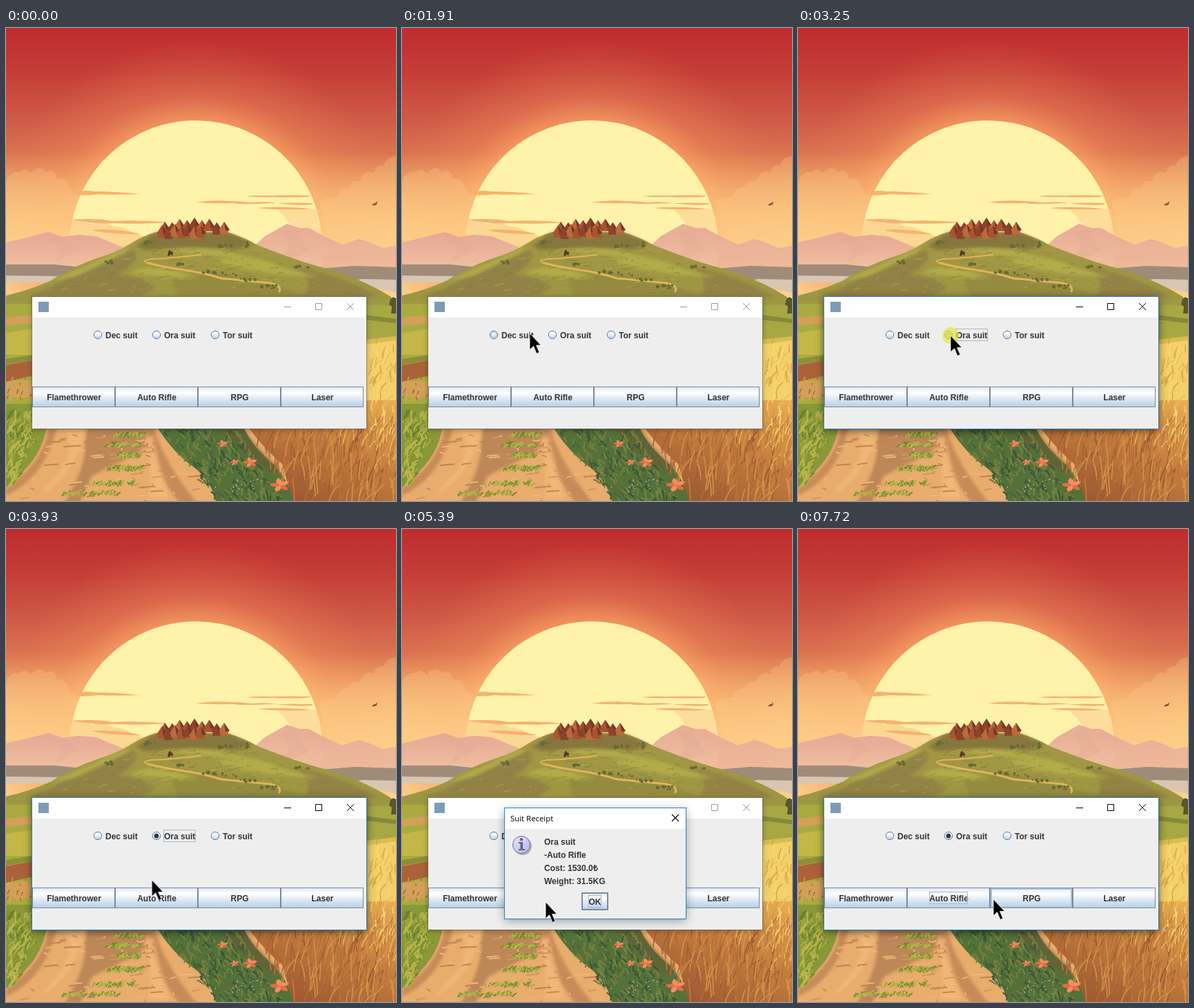
These frames come from a looping animation (565x686 px, 8 s). An HTML page:

```html
<!DOCTYPE html>
<html lang="en">
<head>
<meta charset="utf-8">
<title>Suit Receipt</title>
<style>
html,body{margin:0;width:100%;height:100%;overflow:hidden}
svg{display:block}
text{font:bold 12px "Liberation Sans",Arial,sans-serif;fill:#333}
.mid{text-anchor:middle}
.title{font:11.4px "Open Sans","Noto Sans",sans-serif;fill:#000}
.line{fill:none;stroke-width:1}
.focus{fill:none;stroke:#a3b8cc}

/* Switched parts: hidden unless their keyframes show them */
.sw{opacity:0;animation:8s step-end infinite}
.dec{animation-name:dec}
.ora{animation-name:ora}
.tor{animation-name:tor}
.radioDown{animation-name:radioDown}
.picked{animation-name:picked}
.oraFocus{animation-name:oraFocus}
.active{animation-name:active}
.rifleOver{animation-name:rifleOver}
.rifleDown{animation-name:rifleDown}
.rifleFocus{animation-name:rifleFocus}
.rpgOver{animation-name:rpgOver}
.okDown{animation-name:okDown}
.glow{animation-name:glow}
@keyframes dec{17.04%{opacity:1}24.8%{opacity:0}}
@keyframes ora{7.25%,24.8%,35.69%{opacity:1}16.09%,29.75%,44.46%{opacity:0}}
@keyframes tor{30.75%{opacity:1}35.69%{opacity:0}}
@keyframes radioDown{40.625%{opacity:1}41.625%{opacity:0}}
@keyframes picked{41.625%{opacity:1}}
@keyframes oraFocus{40.625%{opacity:1}62.75%{opacity:0}}
@keyframes active{40.625%,94.66%{opacity:1}64.625%{opacity:0}}
@keyframes rifleOver{50.25%{opacity:1}62.75%{opacity:0}}
@keyframes rifleDown{62.75%{opacity:1}64.625%{opacity:0}}
@keyframes rifleFocus{62.75%{opacity:1}}
@keyframes rpgOver{96.5%{opacity:1}}
@keyframes okDown{93.75%{opacity:1}94.66%{opacity:0}}
@keyframes glow{40.625%,62.75%,93.75%{opacity:.68}41.625%,64.625%,94.66%{opacity:0}}

.dialog{transform-origin:280px 485px;animation:dialog 8s linear infinite}
@keyframes dialog{
  0%{opacity:0;transform:scale(.92)}
  64.625%{opacity:0;transform:scale(.92);animation-timing-function:steps(4,start)}
  68.29%{opacity:1;transform:scale(1)}
  94.66%{opacity:1;transform:scale(1);animation-timing-function:steps(3,start)}
  97.42%,100%{opacity:0;transform:scale(.92)}
}

/* The pointer was sampled, so each move is a run of equal jumps */
.cursor{animation:move 8s linear infinite}
@keyframes move{
  0%{transform:translate(492px,705px)}
  1.5%{transform:translate(492px,705px);animation-timing-function:steps(7,start)}
  8.21%{transform:translate(267px,443px)}
  15.125%{transform:translate(267px,443px);animation-timing-function:steps(4,start)}
  18.96%{transform:translate(153px,442px)}
  23.875%{transform:translate(153px,442px);animation-timing-function:steps(3,start)}
  26.69%{transform:translate(249px,444px)}
  29.75%{transform:translate(249px,444px);animation-timing-function:steps(2,start)}
  31.75%{transform:translate(321px,444px)}
  34.75%{transform:translate(321px,444px);animation-timing-function:steps(2,start)}
  36.625%{transform:translate(276px,455px);animation-timing-function:steps(3,start)}
  39.44%{transform:translate(221px,446px)}
  43.5%{transform:translate(221px,446px);animation-timing-function:steps(8,start)}
  51.21%{transform:translate(208px,530px)}
  57.875%{transform:translate(208px,530px);animation-timing-function:steps(2,start)}
  59.875%{transform:translate(208px,541px)}
  81.875%{transform:translate(208px,541px);animation-timing-function:steps(7,start)}
  88.73%,100%{transform:translate(283px,537px)}
}
</style>
</head>
<body>
<svg width="565" height="686" viewBox="0 0 565 686">
<defs>
  <linearGradient id="sky" x2="0" y2="1">
    <stop stop-color="#bf2c2f"/><stop offset=".17" stop-color="#c53e38"/>
    <stop offset=".35" stop-color="#d05c48"/><stop offset=".52" stop-color="#df7f54"/>
    <stop offset=".66" stop-color="#f0a362"/><stop offset=".78" stop-color="#fac27a"/>
    <stop offset="1" stop-color="#fdd590"/>
  </linearGradient>
  <radialGradient id="halo" gradientUnits="userSpaceOnUse" cx="275" cy="317" r="300">
    <stop offset=".6" stop-color="#f9a063" stop-opacity=".85"/>
    <stop offset=".73" stop-color="#f08a58" stop-opacity=".42"/>
    <stop offset="1" stop-color="#e87850" stop-opacity="0"/>
  </radialGradient>
  <linearGradient id="dusk" x2="0" y2="1">
    <stop stop-color="#fdc981" stop-opacity="0"/><stop offset=".65" stop-color="#fdc981" stop-opacity=".8"/>
    <stop offset="1" stop-color="#fdd08a"/>
  </linearGradient>
  <linearGradient id="peak" x2="0" y2="1">
    <stop stop-color="#e6a795"/><stop offset="1" stop-color="#f0bf9f"/>
  </linearGradient>
  <linearGradient id="hill" x2="0" y2="1">
    <stop stop-color="#a49745"/><stop offset=".6" stop-color="#9d9642"/><stop offset="1" stop-color="#b0a843"/>
  </linearGradient>
  <linearGradient id="wheat" x1="1" x2=".2" y2="1">
    <stop stop-color="#eab052"/><stop offset=".4" stop-color="#c98240"/><stop offset="1" stop-color="#96522f"/>
  </linearGradient>
  <linearGradient id="steel" x2="0" y2="1">
    <stop stop-color="#dde8f3"/><stop offset=".3" stop-color="#fff"/>
    <stop offset=".6" stop-color="#dde8f3"/><stop offset="1" stop-color="#b8cfe5"/>
  </linearGradient>
  <linearGradient id="lilac" x2="1" y2="1">
    <stop stop-color="#e6e6ff"/><stop offset="1" stop-color="#b4b4f0"/>
  </linearGradient>
  <filter id="soft" x="-20%" y="-30%" width="140%" height="160%">
    <feDropShadow dx="0" dy="2" stdDeviation="4" flood-opacity=".32"/>
  </filter>
  <filter id="deep" x="-20%" y="-30%" width="140%" height="160%">
    <feDropShadow dx="0" dy="3" stdDeviation="7" flood-opacity=".38"/>
  </filter>
  <filter id="blur"><feGaussianBlur stdDeviation="2"/></filter>
  <clipPath id="disc"><circle cx="275" cy="317" r="183"/></clipPath>
</defs>

<!-- Sky -->
<rect width="565" height="390" fill="url(#sky)"/>
<rect width="565" height="390" fill="url(#halo)"/>
<rect y="180" width="565" height="150" fill="url(#dusk)"/>
<g fill="#fbcb8c" opacity=".28">
  <path d="M0 222q8-16 20-13 8-8 16 2 12-14 22-2 12-8 16 10 14-4 18 16l20 12-12 33 30 12 40 10v30H0z"/>
  <path d="M565 186q-14 0-18 14-10-4-14 10-14-6-20 12-12-4-18 10-10-4-16 12l-26 6 8 35 10 30h94z"/>
</g>
<circle cx="275" cy="317" r="183" fill="#fff2ab"/>
<g clip-path="url(#disc)">
  <path d="M84 278q28 2 42 6 18-4 30 4 16 0 24 8l20 6-30 18H80z" fill="#fbd793"/>
  <path d="M392 262h72v60h-44q0-36-28-60z" fill="#fcd596" opacity=".7"/>
</g>
<g fill="#f6b26f">
  <path d="M100 239q14-5 28-2 32 0 66 4-44 1-60 0-24 3-40 0z"/>
  <path d="M274 253q26-4 48-2 18 0 34 2 22-2 36 1l-30 1q-20 1-34-1-26 1-54-1zm74-9q18-2 34-1 30-1 60 0l-5 2q-30 1-50 0-22 1-39-1zm44 10q26-1 52 0v2q-24 2-52-2zm-28 7q34-3 78 1l-10 1q-44 1-68-2z"/>
  <path d="M92 278q40-3 62 2 42-2 82 2-48 3-80 1-24 2-64-5zm32 15q20-2 54 2l18 4q-52 0-72-6z"/>
</g>
<path d="M530 257q2-3 5-3l3-3-1 5q-3 2-7 1z" fill="#8a513c"/>

<!-- Mountains and water -->
<path d="M0 311l30-7 32-8 20 7 22-3 26 2 37 15 60 30H0z" fill="url(#peak)"/>
<path d="M355 320l20-18 14-8 18-10 18 6 14 0 22 12 26 12 24-8 16 5 18 8 20-3v50H350z" fill="url(#peak)" opacity=".92"/>
<path d="M60 306l20 12-8 22 36-20-24-16zm340-12l10 26-16 20 46-16-24-32z" fill="#dfa592" opacity=".3"/>
<path d="M0 343l70 0 40 4v14H0zm565 4l-60-2-50 4 40 16 70 6z" fill="#a08b79"/>
<path d="M0 359l85 1-25 9H0zm565 6-50-1-15 4 65 16z" fill="#d9c6b2"/>

<!-- Hill -->
<path d="M0 388q35-8 66-22 26-18 66-32 30-9 48-21 18-12 38-17h102q24 7 45 19 60 24 100 34 60 18 100 46v60H0z" fill="url(#hill)"/>
<g filter="url(#blur)">
  <path d="M62 378q46-30 124-56 10 16-24 36 34 2 54 18l-20 12H30z" fill="#8a7549" opacity=".6"/>
  <path d="M215 297h108l35 16-26 8-62-3-68 4-14-6z" fill="#7b6a3c" opacity=".7"/>
  <path d="M240 364q70-16 120 0t80 26H250z" fill="#8c803f" opacity=".5"/>
  <path d="M420 346q66 12 120 44H430q20-22-10-44z" fill="#8b7448" opacity=".55"/>
  <path d="M64 368q62-28 116-52l-8 10-70 34zM300 338q50-12 84 2 30 14 70 20-70 2-154-22zM180 356q22-14 60-6l40 14q-50-2-100-8zM230 322q40-6 90 2 20 6 40 10-60-2-130-12z" fill="#b6b04c" opacity=".85"/>
</g>
<g id="turf" fill="none" stroke-linecap="round" opacity=".55"></g>
<g fill="none" stroke="#e2b45c" stroke-linecap="round">
  <path d="M282 329q-46 5-72 6-18 3 0 7" stroke-width="2"/>
  <path d="M206 341q24 6 46 9 30 4 60 13l72 7q16 4 12 12" stroke-width="3"/>
</g>
<g id="town"></g>
<g id="bushes" fill="#666b35"></g>
<path d="M234 330l1-5 2-4 2 3 3 1-1 6-2-3-3 3z" fill="#573a2a"/>

<!-- Fields -->
<rect y="400" width="40" height="190" fill="#a9ab40"/>
<path d="M0 420l40-4v12l-40 4zm0 92h40v24H0z" fill="#d2a058"/>
<path d="M0 442l40-6v38H0z" fill="#c3b748"/>
<path d="M0 480l40-6v8l-40 6z" fill="#8b8f3a"/>
<path d="M0 489l40-7v22l-40 9z" fill="#ac6238"/>
<rect x="520" y="402" width="45" height="190" fill="#f3d068"/>
<path d="M520 402h45v50h-45z" fill="#a7a744"/>
<path d="M520 416l45 6v6l-45-5z" fill="#858a3a"/>
<path d="M520 452l45-5v6l-45 6z" fill="#d8bd50"/>
<path d="M558 414l1-10-4-3 2-8 4-3 4 2v22z" fill="#59572c"/>

<!-- Foreground -->
<rect y="545" width="200" height="141" fill="#8b9838"/>
<path d="M60 570H565v116H0v-20q16-6 26-24 30-30 34-72z" fill="#e8ac6c"/>
<g filter="url(#blur)">
  <path d="M118 572h84q6 20-8 44-40 18-70 34l-18 40H84q30-50 30-80z" fill="#ac7850" opacity=".7"/>
  <path d="M62 572q-2 42-38 76l-24 20v10q58-26 76-106zm150 0q14 56 66 118h-26q-42-54-50-118z" fill="#b87e50" opacity=".7"/>
  <path d="M84 584q18 20-2 54l-34 40q50-24 66-94zM212 590q12 50 24 92h-30q6-40-4-84z" fill="#f4bb7c" opacity=".7"/>
</g>
<path d="M338 560q28 44 62 72 10 30 12 54h153V540h-45v20z" fill="url(#wheat)"/>
<path d="M214 570q24 44 62 70 22 20 28 46h112q-8-36-34-58-30-26-42-58z" fill="#55713a"/>
<path d="M300 572h40q14 30 56 66l-12 8q-50-34-84-74z" fill="#6b5a35" opacity=".6" filter="url(#blur)"/>
<g id="grass" fill="none" stroke-linecap="round"></g>
<g id="flowers"></g>

<!-- Main window -->
<rect x="38" y="390" width="484" height="191" filter="url(#soft)"/>
<rect class="sw active" x="38" y="390" width="484" height="191" filter="url(#deep)"/>
<rect x="38" y="390" width="484" height="191" fill="#eee"/>
<rect x="38" y="390" width="484" height="30" fill="#fff"/>
<rect class="line" x="37.5" y="389.5" width="485" height="192" stroke="#666" stroke-opacity=".55"/>
<rect class="line sw active" x="37.5" y="389.5" width="485" height="192" stroke="#2b83bd"/>
<rect x="47" y="397" width="15" height="15" fill="#7d9bb5"/>
<path id="chrome" class="line" d="M403 404.5h10M448.5 399.5h9v9h-9zM494 399l10 10m0-10l-10 10" stroke="#999"/>
<use href="#chrome" class="sw active" style="filter:brightness(0)"/>
<g id="radios"></g>
<rect class="focus sw oraFocus" x="228.5" y="436.5" width="46" height="17"/>
<g id="buttons"></g>
<rect class="line sw rifleOver" x="160" y="522" width="116" height="26" stroke="#b8cfe5" style="stroke-width:2"/>
<rect class="line sw rpgOver" x="280" y="522" width="116" height="26" stroke="#a9c3dd" style="stroke-width:2"/>
<g class="sw rifleDown">
  <rect x="159" y="521" width="119" height="28" fill="#b8cfe5"/>
  <path class="line" d="M159.5 549v-27.5h118" stroke="#7a8a99"/>
  <text class="mid" x="218" y="540">Auto Rifle</text>
</g>
<rect class="focus sw rifleFocus" x="190.5" y="526.5" width="55" height="17"/>

<!-- Receipt -->
<g class="dialog">
  <rect x="149" y="405" width="262" height="160" filter="url(#deep)"/>
  <rect x="148.5" y="404.5" width="263" height="161" fill="#eee" stroke="#2286c6"/>
  <rect x="149" y="405" width="262" height="30" fill="#fff"/>
  <text class="title" x="157" y="424">Suit Receipt</text>
  <path class="line" d="M391 414l10 10m0-10l-10 10" stroke="#000" style="stroke-width:1.2"/>
  <circle cx="175" cy="460" r="13" fill="#999" opacity=".7"/>
  <circle cx="173" cy="458" r="12.5" fill="url(#lilac)" stroke="#666d99"/>
  <path d="M169 454h6v10h3v2h-9v-2h2.5v-8H169zM171 448.5h4v3.5h-4z" fill="#666"/>
  <text x="206" y="458">Ora suit</text>
  <text x="206" y="477">-Auto Rifle</text>
  <text x="206" y="496">Cost: 1530.0₺</text>
  <text x="206" y="515">Weight: 31.5KG</text>
  <rect x="261" y="528" width="37" height="24" fill="url(#steel)" stroke="#7a8a99" stroke-width="2"/>
  <rect class="sw okDown" x="262" y="529" width="35" height="22" fill="#b8cfe5"/>
  <rect class="focus" x="270.5" y="531.5" width="18" height="17"/>
  <text class="mid" x="279.5" y="545">OK</text>
</g>

<g class="cursor">
  <circle class="sw glow" r="12" fill="#e6e638"/>
  <path d="M0 0V24L5.5 18.8 10 29.5 14 27.8 9.5 17.5H16.5Z" stroke="#fff" stroke-width=".8"/>
</g>
</svg>

<script>
const $ = id => document.getElementById(id);
let seed = 11;
const rnd = () => (seed = seed * 16807 % 2147483647) / 2147483647;
const between = (a, b) => a + (b - a) * rnd();
const mix = (a, b, k) => a + (b - a) * k;

// Widgets
const radios = [['Dec suit', 133, 'dec'], ['Ora suit', 218, 'ora'], ['Tor suit', 303, 'tor']];
$('radios').innerHTML = radios.map(([label, x, over]) =>
  `<circle cx="${x}" cy="445" r="5.7" fill="url(#steel)" stroke="#5f7b9c"/>
   <circle class="line sw ${over}" cx="${x}" cy="445" r="4" stroke="#b8cfe5" style="stroke-width:2"/>
   <text x="${x + 11}" y="450">${label}</text>`).join('') +
  `<circle class="sw radioDown" cx="218" cy="445" r="5" fill="#b8c4ce"/>
   <circle class="sw picked" cx="218" cy="445" r="3.3" fill="#333"/>`;
$('buttons').innerHTML = ['Flamethrower', 'Auto Rifle', 'RPG', 'Laser'].map((label, i) =>
  `<rect x="${38.5 + i * 120}" y="520.5" width="119" height="29" fill="url(#steel)" stroke="#7a8a99"/>
   <text class="mid" x="${98.5 + i * 120}" y="540">${label}</text>`).join('');

// Two overlapping rows of roofs, highest in the middle of the hilltop
const roofs = ['#a9532f', '#8d432b', '#bd6a3a'];
const roofRow = (count, left, right, top, rise) => Array.from({length: count}, (_, i) => {
  const k = i / (count - 1), x = mix(left, right, k), y = top - rise * Math.sin(k * Math.PI) + i % 2 * 3;
  return `<path d="M${x - 8} ${y + 12}L${x} ${y}l8 12-2 1v5h-12v-5z" fill="${roofs[i % 3]}"/>
    <path d="M${x} ${y}l8 12-6 1z" fill="#74382a"/>`;
}).join('');
$('town').innerHTML = roofRow(9, 230, 316, 281, 6) + roofRow(7, 226, 282, 286, 2);

const clumps = [[210, 312, 9, 4], [318, 317, 9, 3], [344, 315, 7, 4], [318, 357, 18, 3], [292, 354, 9, 2],
  [352, 366, 12, 2], [252, 343, 7, 2], [428, 347, 12, 2], [148, 340, 8, 2], [382, 376, 14, 3]];
$('bushes').innerHTML = clumps.map(([x, y, w, h]) => Array.from({length: 7}, () =>
  `<circle cx="${between(x - w, x + w)}" cy="${between(y - h, y + h / 2)}" r="${between(1, 2.6)}"/>`).join('')).join('');

// Blades fill a band given by its top and bottom edges: [y, left, right]
function blades(layer, [y0, l0, r0], [y1, l1, r1], count, len, lean, width, colors) {
  const paths = colors.map(color => {
    let d = '';
    for (let i = 0; i < count; i++) {
      const k = rnd(), y = mix(y0, y1, k), x = between(mix(l0, l1, k), mix(r0, r1, k));
      const h = len * between(.5, 1.2), w = lean * between(-.4, 1.3);
      d += `M${x.toFixed(1)} ${y.toFixed(1)}q${(w * .2).toFixed(1)}-${(h * .6).toFixed(1)} ${w.toFixed(1)}-${h.toFixed(1)}`;
    }
    return `<path d="${d}" stroke="${color}" stroke-width="${width}"/>`;
  });
  $(layer).innerHTML += paths.join('');
}
const greens = ['#66802f', '#a5ab40', '#7f9336', '#b9b54a'];
blades('turf', [318, 205, 350], [386, 40, 500], 60, 1.5, 9, 1.3, ['#7f7a3a', '#b7ac4e', '#8a7846']);
blades('grass', [560, 0, 58], [664, 0, 10], 60, 9, 7, 2.2, greens);
blades('grass', [500, 0, 38], [545, 0, 38], 12, 5, 3, 1.5, ['#d9a558', '#a9683a']);
blades('grass', [590, 64, 225], [690, 10, 290], 24, 2, 18, 2, ['#efb577', '#d3955f', '#c08355']);
[[592, 176, 22], [607, 166, 28], [622, 178, 18], [641, 172, 30], [663, 156, 38], [677, 120, 46]].forEach(([y, x, w]) =>
  blades('grass', [y - 2, x - w * .7, x + w * .7], [y + 2, x - w, x + w], 13, 5, 6, 1.7, greens));
blades('grass', [585, 222, 335], [690, 306, 405], 65, 7, -6, 2.2, ['#446138', '#6d873f', '#3c5537', '#7c7c3e']);
blades('grass', [590, 352, 565], [695, 415, 565], 50, 34, 16, 1.5, ['#a05c35', '#c67f3d', '#b46c39', '#d3934a']);
blades('grass', [585, 480, 565], [640, 500, 565], 18, 30, 14, 1.5, ['#ebbb5c', '#c78342']);
blades('grass', [455, 522, 565], [590, 522, 565], 20, 14, 7, 1.4, ['#e5b955', '#f8da7a', '#d6a14a']);

const bloom = ([x, y, r]) => [0, 1, 2, 3, 4].map(i =>
  `<path d="M0 0q${r * .5}-${r * .55} ${r} 0-${r * .5} ${r * .55}-${r} 0" transform="translate(${x} ${y}) scale(1 .7) rotate(${i * 72 - 30})" fill="${i % 2 ? '#e86c40' : '#fa8a62'}"/>`).join('');
const specks = Array.from({length: 22}, () =>
  `<circle cx="${between(285, 375)}" cy="${between(640, 680)}" r="1" fill="#9cb0a8"/>`).join('');
$('flowers').innerHTML = specks + [[314, 603, 8], [354, 630, 11], [331, 630, 7], [397, 663, 15]].map(bloom).join('');
</script>
</body>
</html>
```
